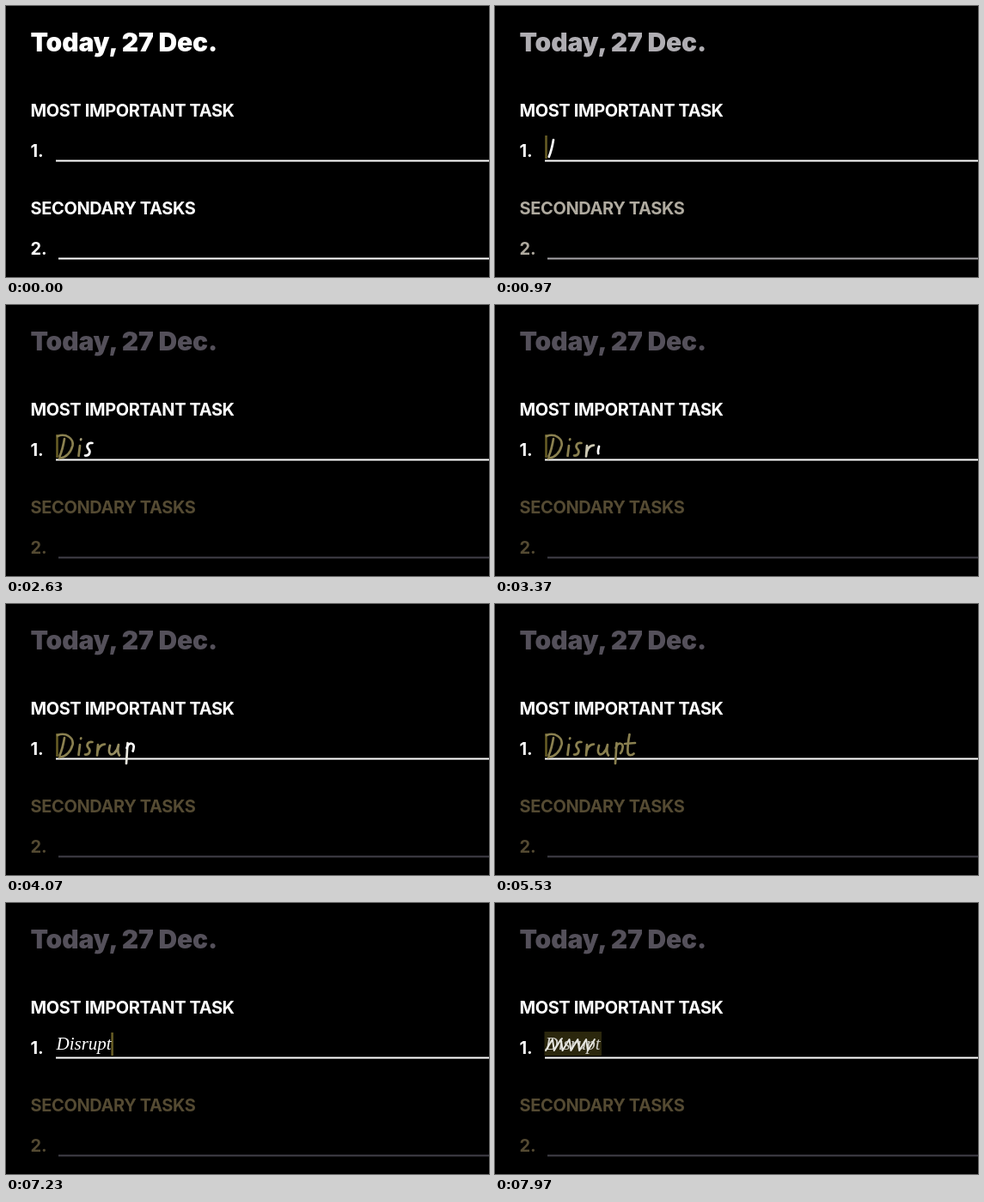
Write an HTML page that moves like this. It is 562 px wide and 316 px high and loops after 8 s.

```html
<!DOCTYPE html>
<html lang="en">
<head>
<meta charset="utf-8">
<title>Daily tasks</title>
<style>
  html, body { margin: 0; width: 100%; height: 100%; overflow: hidden; background: #000; }
  svg { display: block; width: 100vw; height: 100vh; }
  text { font: 700 20px Inter, sans-serif; fill: currentColor; }
  #title { font-weight: 900; font-size: 30px; letter-spacing: -0.15px; }
  #typed { font: italic 21px "Liberation Serif", serif; }
  .heading { letter-spacing: -0.38px; }
  .rule { stroke: currentColor; stroke-width: 2; }
  .ink { fill: none; stroke-width: 2.7; stroke-linecap: round; stroke-linejoin: round; }
  #scratch .ink { stroke-width: 2; }
</style>
</head>
<body>
<svg viewBox="0 0 562 316" color="#fff">
  <text id="title" x="28.5" y="53">Today, 27 Dec.</text>
  <text class="heading" x="28.5" y="129">MOST IMPORTANT TASK</text>
  <text x="28.5" y="176">1.</text>
  <path class="rule" d="M58 180.5H562"/>
  <g id="secondary">
    <text class="heading" x="28.5" y="243">SECONDARY TASKS</text>
    <text x="28.5" y="290">2.</text>
  </g>
  <path id="secondaryRule" class="rule" d="M61 294.5H562"/>
  <rect id="selection" x="57.5" y="150" width="66.5" height="28" fill="#2b270d"/>
  <rect id="cursor" x="58.2" y="151" width="2.6" height="27" fill="#655b24"/>
  <text id="typed" x="58.5" y="171">Disrupt</text>
  <g id="handwriting"></g>
  <g id="scratch"></g>
</svg>
<script>
const LOOP = 8000;
const byId = id => document.getElementById(id);
const clamp = v => Math.max(0, Math.min(1, v));
const progress = (t, start, end) => clamp((t - start) / (end - start));
const ease = p => p * p * (3 - 2 * p);
const mix = (a, b, p) => `rgb(${a.map((v, i) => Math.round(v + (b[i] - v) * p))})`;

const WHITE = [255, 255, 255];
const OLD_INK = [138, 128, 80];
const SCRATCH_INK = [230, 230, 225];
const DIMMED = {
  title: [84, 80, 90],
  secondary: [84, 74, 50],
  secondaryRule: [66, 65, 74]
};

// Each stroke: start time, end time, path
const strokes = [
  [760, 1000, "M68 156Q66 168 62.5 176.5"],
  [1250, 1750, "M60 153C70 149 79 156 77.5 164C75 173 69 178 62 179"],
  [1930, 2100, "M86 164L84.5 176"],
  [2200, 2240, "M87.3 156.5L87 157"],
  [2340, 2640, "M100.5 161C95 160 93 165 96 168C99 171 97 176 92 175.5"],
  [2800, 3120, "M107 164L106 176.5Q107 164 115 163.5"],
  [3270, 3620, "M121 165C118 175 122 177 126 174Q130 170 131 164Q129 173 132 176.5"],
  [3760, 3930, "M141.5 162L140 186"],
  [3930, 4120, "M140.5 168C143 160 150 162 148.5 168Q148 172 146 174"],
  [4380, 4680, "M156.5 152Q154 165 154.5 173C155 177 159 177 161.5 174.5"],
  [4820, 4980, "M151 163L163 162"]
];

const zigzag = "M" + Array.from({ length: 12 }, (_, i) =>
  `${59 + i * 4.9 + (i % 2) * 3},${i % 2 ? 159 : 172}`).join("L");

function addStroke(parent, d) {
  const path = document.createElementNS("http://www.w3.org/2000/svg", "path");
  path.setAttribute("d", d);
  path.setAttribute("class", "ink");
  parent.append(path);
  const length = path.getTotalLength();
  path.style.strokeDasharray = `${length} ${length + 10}`;
  return (p, color) => {
    path.style.visibility = p > 0 ? "visible" : "hidden";
    path.style.strokeDashoffset = length * (1 - p);
    path.style.stroke = color;
  };
}

const pen = strokes.map(([start, end, d]) => ({ start, end, draw: addStroke(byId("handwriting"), d) }));
const drawScratch = addStroke(byId("scratch"), zigzag);

function render(t) {
  const dim = progress(t, 700, 1280);
  for (const [id, color] of Object.entries(DIMMED)) byId(id).style.color = mix(WHITE, color, dim);

  for (const { start, end, draw } of pen) {
    draw(ease(progress(t, start, end)), mix(WHITE, OLD_INK, progress(t, end + 60, end + 500)));
  }

  const converted = ease(progress(t, 5820, 6020));
  byId("handwriting").style.opacity = 1 - converted;

  const selected = progress(t, 7600, 7800);
  byId("typed").style.opacity = converted * (1 - 0.22 * selected);
  byId("selection").style.opacity = selected;

  byId("cursor").setAttribute("x", t < 5920 ? 58.2 : 122.3);
  byId("cursor").style.opacity = t >= 700 && t < 7350 ? 1 : 0;

  drawScratch(progress(t, 7350, 7970), `rgb(${SCRATCH_INK})`);
}

function frame(now) {
  render(now % LOOP);
  requestAnimationFrame(frame);
}
render(0);
requestAnimationFrame(frame);
</script>
</body>
</html>
```
